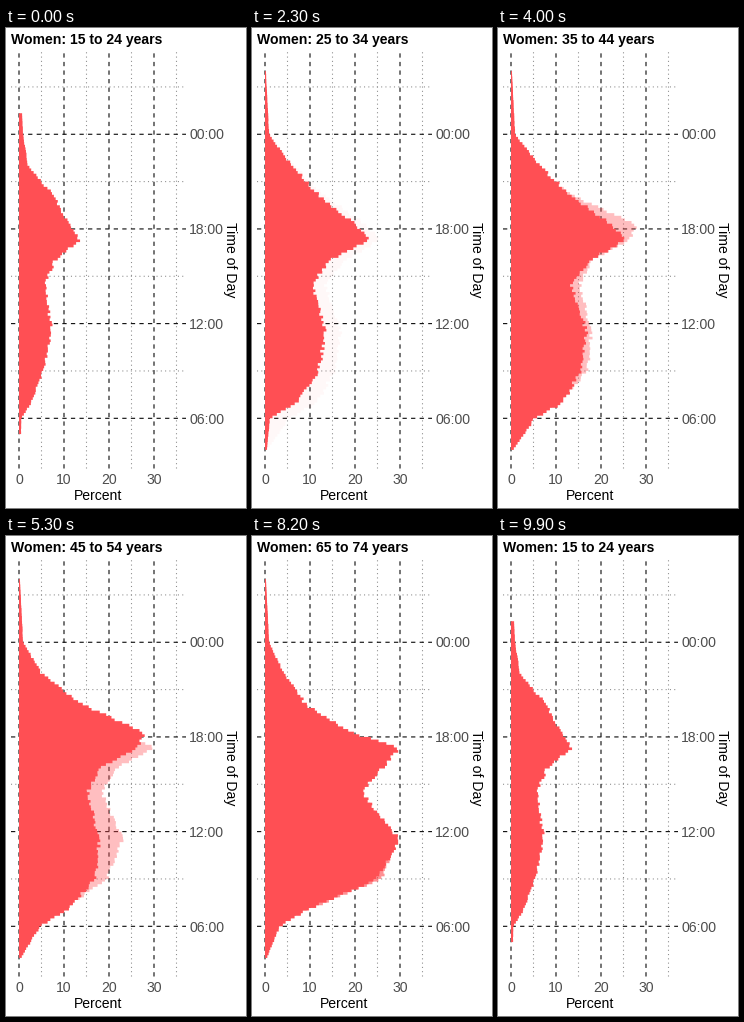
Animation, 240 px wide and 480 px high, one loop 10 s. Source, as a matplotlib script:

```python
import numpy as np
import matplotlib.pyplot as plt
from matplotlib.animation import FuncAnimation
from matplotlib.patches import Polygon

W, H, DPI = 240, 480, 100
PX = 72 / DPI                        # points per pixel
RED, GREY = "#ff4f54", "#4d4d4d"
X0, PER_PCT = 13, 4.5                # x of 0 % and pixels per percent
Y_SIX, PER_HOUR = 390.3, 15.78       # y of 06:00 and pixels per hour
LEFT, RIGHT, TOP, BOTTOM = 5, 180, 24, 440.5
BARS = 144                           # ten-minute bars, 04:00 to 04:00
KEY_HOURS = [4, 6, 7, 9, 11.5, 14.5, 16, 17.3, 18.3, 20, 22, 24, 28]
FRAMES = 100
STARTS = [8, 23, 38, 51, 65, 79, 94]
STEPS = [7] * 6 + [6]

plt.rcParams["font.family"] = "Liberation Sans"
rng = np.random.default_rng(4)


def x_at(pct):
    return X0 + PER_PCT * np.asarray(pct)


def y_at(hour):
    return Y_SIX - PER_HOUR * (np.asarray(hour) - 6)


def profile(*levels, span=(4, 28)):
    """Bar outline through the percentages at the key hours."""
    edges = np.linspace(4, 28, BARS + 1)
    mids = (edges[1:] + edges[:-1]) / 2
    pct = np.interp(mids, KEY_HOURS, [0.4, *levels, 0.9, 0.2])
    pct += rng.uniform(-0.45, 0.45, BARS) * np.clip(pct / 8, 0, 1)
    pct[(mids < span[0]) | (mids > span[1])] = 0
    xs = np.r_[X0, np.repeat(x_at(pct), 2), X0]
    return np.column_stack([xs, y_at(np.repeat(edges, 2))])


shapes = {
    "15 to 24 years": profile(0.5, 2.7, 5.3, 7.3, 5.7, 8, 13.6, 11.2, 8, 2, span=(5, 25.4)),
    "25 to 34 years": profile(1.1, 7, 11.9, 13.5, 10.4, 14.4, 23, 20, 12.4, 6),
    "35 to 44 years": profile(5.3, 11.5, 15.5, 16.8, 13.4, 17.5, 25.5, 22.2, 13.8, 6.4),
    "45 to 54 years": profile(4.7, 10.5, 17, 17.8, 15.2, 18, 26.6, 27.8, 14.4, 5.1),
    "55 to 64 years": profile(4, 9.5, 19.6, 23.1, 18.4, 21.5, 30.2, 22.2, 10.4, 4.1),
    "65 to 74 years": profile(3.3, 9, 25, 29.8, 21.4, 26, 29.8, 19, 9.2, 4.2),
    "75 years and over": profile(1.9, 9, 26, 29, 21, 24.5, 28.5, 18, 7.5, 2),
}
names = list(shapes)

fig = plt.figure(figsize=(W / DPI, H / DPI), dpi=DPI, facecolor="white")
ax = fig.add_axes([0, 0, 1, 1])
ax.set(xlim=(0, W), ylim=(H, 0))
ax.axis("off")


def label(x, y, text, **style):
    style = {"fontsize": 14 * PX, "va": "baseline", "color": "black", **style}
    return ax.text(x, y, text, **style)


def grid(xs, ys, color, dash):
    style = dict(color=color, lw=1.07 * PX, ls=(0, dash), dash_capstyle="butt",
                 snap=False, zorder=0)
    for x in xs:
        ax.plot([x, x], [BOTTOM, TOP], **style)
    for y in ys:
        ax.plot([LEFT, RIGHT], [y, y], **style)


percents, hours = np.arange(0, 40, 10), np.arange(6, 30, 6)
grid(x_at(percents + 5), y_at(hours + 3), "#8c8c8c", (1, 3))
grid(x_at(percents), y_at(hours), "black", (4, 4))

for pct in percents:
    label(x_at(pct), 456, str(pct), ha="center", color=GREY)
for hour in hours:
    label(183, y_at(hour) + 5.2, f"{hour % 24:02d}:00", color=GREY)
label((LEFT + RIGHT) / 2, 472, "Percent", ha="center")
label(217, 231.5, "Time of Day", rotation=270, va="center")
title = label(5, 16, "", weight="bold")

current, incoming = (
    ax.add_patch(Polygon(shapes[names[0]], fc=RED, lw=0, snap=False, zorder=z))
    for z in (1, 2))


def ease(t):
    return 2 * t * t if t < 0.5 else 1 - 2 * (1 - t) ** 2


def draw(frame):
    state, t = 0, 0
    for i, (start, steps) in enumerate(zip(STARTS, STEPS)):
        if frame >= start:
            state, t = i, min((frame - start + 1) / steps, 1)
    following = (state + 1) % len(names)
    if t == 1:
        state, t = following, 0
    current.set_xy(shapes[names[state]])
    incoming.set_xy(shapes[names[following]])
    incoming.set_alpha(ease(t))
    title.set_text("Women: " + names[following if t > 0.6 else state])
    return current, incoming, title


anim = FuncAnimation(fig, draw, frames=FRAMES, interval=100, repeat=True,
                     repeat_delay=0, blit=False)
plt.show()
```
